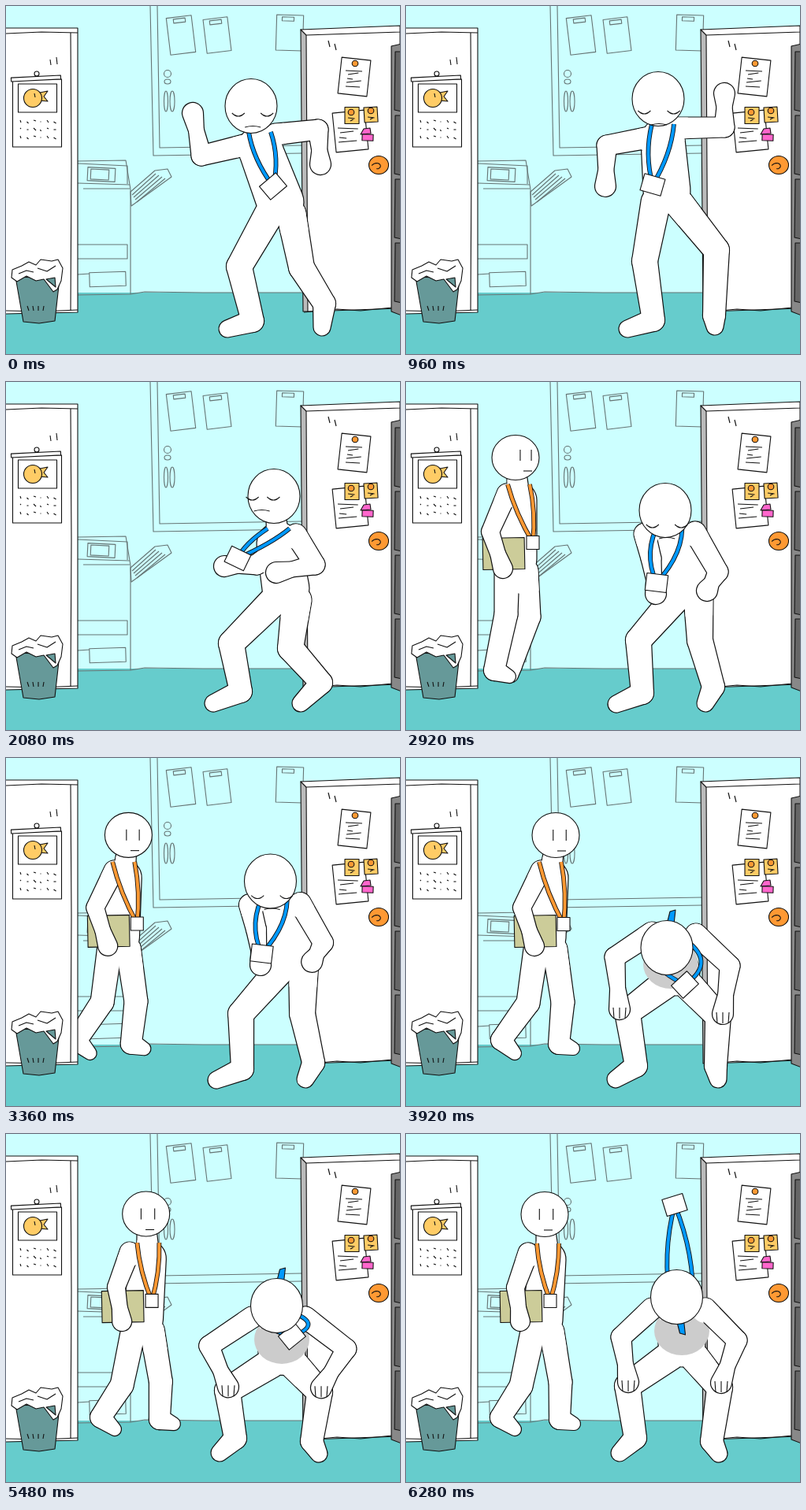
An HTML page with a canvas that plays this animation: 500x442 px, repeating every 6360 ms.

```html
<!DOCTYPE html>
<html lang="en">
<head>
<meta charset="utf-8">
<title>Office dance</title>
<style>
html, body { margin: 0; width: 100%; height: 100%; overflow: hidden; background: #cff; }
canvas { display: block; }
</style>
</head>
<body>
<canvas id="stage" width="500" height="442"></canvas>
<script>
const g = document.getElementById('stage').getContext('2d');
const LOOP = 6360, INK = '#111', GREY = '#667474';

// ---------- drawing helpers ----------
const pts = (s, size = 2) => {
  const n = s.split(' ').map(Number), out = [];
  for (let i = 0; i < n.length; i += size) out.push(n.slice(i, i + size));
  return out;
};

function paint(fill, ink, w = 1.1) {
  if (fill) { g.fillStyle = fill; g.fill(); }
  if (ink) { g.strokeStyle = ink; g.lineWidth = w; g.stroke(); }
}
function path(s, closed) {
  g.beginPath();
  pts(s).forEach(p => g.lineTo(...p));
  if (closed) g.closePath();
}
const poly = (s, fill, ink = INK) => { path(s, true); paint(fill, ink); };
const pen = (s, ink = INK) => { path(s); paint(null, ink); };

function oval(x, y, rx, ry, fill, ink = INK) {
  g.beginPath();
  g.ellipse(x, y, rx, ry, 0, 0, 7);
  paint(fill, ink);
}
function sheet(x, y, w, h, tilt, fill, ink = INK) {
  g.save();
  g.translate(x, y);
  g.rotate(tilt);
  g.beginPath();
  g.rect(-w / 2, -h / 2, w, h);
  g.restore();
  paint(fill, ink);
}
function arc(x, y, w, sag) {
  g.beginPath();
  g.moveTo(x - w / 2, y);
  g.quadraticCurveTo(x, y + sag * 2, x + w / 2, y);
  paint(null, INK);
}
// Short hand-drawn lines standing for writing.
function scribble(x, y, w, rows, gap) {
  for (let i = 0; i < rows; i++) {
    const left = x + (i * 7) % 4, right = x + w * (.7 + .3 * Math.sin(i * 2 + 1));
    pen(`${left} ${y + i * gap} ${right} ${y + i * gap + (i % 2 ? -2 : 1)}`);
  }
}

// ---------- room ----------
function backWall() {
  g.fillStyle = '#cff';
  g.fillRect(0, 0, 500, 442);
  g.fillStyle = '#6cc';
  g.fillRect(0, 364, 500, 78);
  pen('90 367 158 366 176 363 250 364 376 364', GREY);

  pen('183 0 187 190 376 187', GREY);
  pen('192 0 195 180 376 177', GREY);
  [[222, 37, 32, 47, -.12], [268, 37, 31, 43, -.12], [360, 34, 34, 45, .03]].forEach(([x, y, w, h, tilt]) => {
    sheet(x, y, w, h, tilt, null, GREY);
    sheet(x - 2, y - h / 2 + 5, 15, 5, tilt, null, GREY);
  });
  oval(205, 86, 4.5, 4.5, null, GREY);
  oval(205, 96, 4, 3, null, GREY);
  oval(203, 121, 2.5, 13, null, GREY);
  oval(211, 121, 3, 13, null, GREY);

  pen('91 197 152 196 158 233 158 366', GREY);
  pen('91 200 154 203 154 226', GREY);
  pen('91 225 157 227', GREY);
  pen('98 232 157 232', GREY);
  sheet(121, 214, 35, 17, .05, null, GREY);
  sheet(119, 214, 23, 13, .05, null, GREY);
  sheet(122, 312, 64, 18, 0, null, GREY);
  sheet(129, 347, 46, 18, -.03, null, GREY);
  pen('91 341 106 340', GREY);
  poly('158 236 189 209 205 207 210 217 159 254', null, GREY);
  for (let i = 0; i < 4; i++) pen(`${160 + i * 2} ${240 + i * 3} ${190 + i * 4} ${213 + i * 2}`, GREY);
}

function rightDoor() {
  poly('374 30 384 34 384 388 377 388', '#bbb');
  poly('381 36 500 32 500 384 383 388', '#fff');
  poly('374 30 500 25 500 33 381 37', '#fff');
  pen('378 389 420 385 450 387 490 383');
  pen('409 44 411 52');
  pen('417 48 419 56');

  poly('489 51 502 48 502 393 489 388', '#888');
  for (let i = 0; i < 4; i++) {
    const y = 58 + i * 81;
    poly(`494 ${y} 502 ${y} 502 ${y + 76} 493 ${y + 74}`, '#666');
  }

  sheet(442, 90, 37, 46, .11, '#fff');
  scribble(431, 82, 22, 5, 5);
  sheet(437, 159, 41, 50, -.1, '#fff');
  scribble(421, 155, 27, 4, 6);
  sheet(439, 139, 18, 21, 0, '#fc6');
  sheet(463, 138, 17, 19, -.06, '#fc6');
  [[443, 73], [438, 135], [463, 133]].forEach(([x, y]) => oval(x, y, 3.8, 3.8, '#f93'));
  scribble(434, 142, 9, 2, 4);
  scribble(459, 141, 9, 2, 3);
  poly('450 163 454 156 462 155 463 162', '#f6c');
  sheet(459, 167, 14, 8, .03, '#f6c');
  oval(473, 202, 12.5, 11.5, '#f93');
  g.beginPath();
  for (let a = 0; a < 5; a += .3) g.lineTo(471 + Math.cos(a + 3.4) * (7 - a), 204 + Math.sin(a + 3.4) * (5 - a / 2));
  paint(null, INK);
}

function leftDoor() {
  poly('-2 28 91 28 91 389 -2 391', '#fff');
  pen('0 35 45 33 91 34');
  pen('82 34 83 200 82 387');
  pen('0 387 45 388 91 386');
  pen('56 68 57 75');
  pen('64 65 65 74');

  sheet(39.5, 136, 62, 86, 0, '#fff');
  sheet(38, 92, 63, 5, -.05, '#fff');
  oval(39, 86, 3, 3, null);
  sheet(40, 117, 49, 36, 0, '#fff');
  poly('43 110 53 108 48 115 53 121 42 120', '#fc6');
  oval(34, 117, 11.5, 11.5, '#fc6');
  pen('36 111 37 116');
  for (let i = 0; i < 18; i++) {
    const x = 18 + i % 6 * 8.5, y = 145 + Math.floor(i / 6) * 10 + i % 2 * 2;
    pen(`${x} ${y} ${x + 1 + i % 3} ${y + 3 - i % 4}`);
  }

  poly('12 344 22 401 42 403 62 400 68 346', '#699');
  poly('7 345 8 335 20 330 29 325 38 329 44 322 58 324 66 322 72 333 70 349 65 360 60 363 48 347 38 349 26 343 14 350', '#fff');
  poly('51 347 62 345 63 357', '#699');
  pen('16 340 26 336 35 338');
  pen('40 333 52 337 63 330');
  for (let i = 0; i < 4; i++) pen(`${27 + i * 7} 381 ${29 + i * 6} 387`);
}

// ---------- figures ----------
// arm: shoulder, elbow, hand; leg: knee, ankle, toe; look: face offset and strap sag; card: centre and tilt.
function pose(parts) {
  const out = {};
  for (const k in parts) out[k] = pts(parts[k], k === 'look' || k === 'card' ? 3 : 2);
  return out;
}
function shift(p, rule) {
  const out = {};
  for (const k in p) out[k] = k === 'look' ? p[k] : p[k].map(([x, y, ...rest]) => [...rule(x, y), ...rest]);
  return out;
}
const move = (p, dx) => shift(p, (x, y) => [x + dx, y]);
// Feet stay planted while the upper body moves.
const lean = (p, dx, dy) => shift(p, (x, y) => {
  const k = Math.min(1, Math.max(0, (390 - y) / 130));
  return [x + dx * k, y + dy * k];
});

const armUp = pose({
  head: '311 127', look: '2 10 10', chest: '322 180', pelvis: '348 249', card: '339 229 -.7',
  armL: '302 177 248 190 237 136', armR: '342 163 396 157 399 201',
  legL: '296 331 313 400 281 410', legR: '375 332 404 378 401 408'
});
const armOut = pose({
  head: '320 118', look: '1 16 10', chest: '326 170', pelvis: '331 234', card: '313 227 .28',
  armL: '308 167 255 177 253 229', armR: '346 155 404 154 404 111',
  legL: '303 324 314 399 281 410', legR: '394 310 391 393 392 407'
});
const armHigh = { ...armOut, armR: pts('346 155 418 146 424 84') };
const sway = pose({
  head: '340 145', look: '-14 2 10', chest: '346 206', pelvis: '355 262', card: '294 224 .45',
  armL: '330 224 318 232 277 234', armR: '368 194 392 232 343 242',
  legL: '286 332 298 393 263 408', legR: '361 338 400 382 374 408'
});
const stoop = pose({
  head: '329 163', look: '2 19 20', chest: '336 197', pelvis: '357 258', card: '318 255 .12',
  armL: '303 193 311 224 317 269', armR: '367 191 396 241 382 265',
  legL: '295 328 300 395 267 409', legR: '373 328 390 387 380 408'
});
const hunch = pose({
  head: '331 241', look: '0 40 45', chest: '336 248', pelvis: '343 272', card: '354 288 -.75',
  armL: '312 222 265 253 271 319', armR: '368 224 411 264 402 325',
  legL: '281 323 292 391 266 408', legR: '396 328 393 391 396 408'
});
const squat = pose({
  head: '343.5 207', look: '0 40 14', chest: '350 236', pelvis: '350 266', card: '341 90 -.3',
  armL: '312 222 273 258 282 315', armR: '380 222 420 262 400 316',
  legL: '281 320 291 386 271 405', legR: '398 322 388 390 397 406'
});
const squatLow = { ...lean(squat, 0, 13), look: hunch.look, card: move(hunch, 13).card };
squatLow.armL[1][0] -= 18;
squatLow.armR[1][0] += 14;

const walk = pose({
  head: '139 96', look: '13 -3 6', chest: '143 150', pelvis: '140 225', card: '161 204 0',
  armL: '128 142 107 190 123 237', legL: '127 295 112 366 131 374', legR: '156 298 134 360 134 373'
});
const stride = pose({
  head: '190 98', look: '5 0 6', chest: '183 152', pelvis: '177 228', card: '200 211 0',
  armL: '171 143 147 190 163 239', legL: '155 311 121 358 138 375', legR: '199 310 194 363 212 369'
});
const stand = pose({
  head: '176 102', look: '2 0 6', chest: '180 159', pelvis: '173 236', card: '183 212 0',
  armL: '155 151 139 195 145 238', legL: '146 320 120 360 138 375', legR: '196 315 195 362 213 368'
});

const DANCER = {
  strap: '#09f', head: [33, 34.5], body: [28, 30], arm: [14, 13, 10, 13.5], leg: [19, 16.5, 14.5, 11],
  hips: 14, card: [27, 22]
};
const WALKER = {
  strap: '#f93', head: [30, 28.5], body: [23, 26], arm: [13, 11.5, 10, 12.5], leg: [16, 15, 13.5, 8.5],
  hips: 12, card: [16, 17], folder: [53, 40]
};

// Tapered limb piece between two discs.
function capsule([x1, y1, r1], [x2, y2, r2], grow) {
  const l = Math.hypot(x2 - x1, y2 - y1), a = Math.atan2(y2 - y1, x2 - x1);
  const d = Math.acos(Math.max(-1, Math.min(1, (r1 - r2) / (l || 1))));
  g.beginPath();
  g.arc(x1, y1, r1 + grow, a + d, a - d + 2 * Math.PI);
  g.arc(x2, y2, r2 + grow, a - d, a + d);
  g.closePath();
  g.fill();
}
function fillChains(chains, colour, grow) {
  g.fillStyle = colour;
  chains.forEach(c => c.slice(1).forEach((p, i) => capsule(c[i], p, grow)));
}
function inked(chains) {
  fillChains(chains, INK, .6);
  fillChains(chains, '#fff', -.6);
}
// Removes the outline where two parts join.
function weld([x, y], r, chains) {
  g.save();
  g.beginPath();
  g.arc(x, y, r, 0, 7);
  g.clip();
  fillChains(chains, '#fff', -.6);
  g.restore();
}

function face([x, y], [dx, dy], s) {
  const cx = x + dx, cy = y + dy;
  if (s === DANCER) {
    const gap = 19 - Math.abs(dx) * .4;
    arc(cx - gap, cy - 1, 16, 4);
    arc(cx + gap, cy - 1, 16, 4);
    arc(cx + dx * .1, cy + 17, 20, -1.5);
  } else {
    const gap = 9 - dx * .15;
    [-gap, gap].forEach(o => pen(`${cx + o} ${cy - 7} ${cx + o} ${cy + 7}`));
    pen(`${cx - 3} ${cy + 20} ${cx + 8} ${cy + 20}`);
  }
}

function person(p, s) {
  const [head] = p.head, [look] = p.look, [chest] = p.chest, [pelvis] = p.pelvis, [card] = p.card;
  const bowed = look[1] > 30;
  const disc = (q, r) => [q[0], q[1], r];
  const leg = (joints, side) =>
    [[pelvis[0] + side * s.hips, pelvis[1] + 15], ...joints].map((q, i) => disc(q, s.leg[i]));
  const legL = leg(p.legL, -1), legR = leg(p.legR, 1);
  const torso = [
    [disc(chest, s.body[0]), disc(pelvis, s.body[1])],
    [disc(head, 11), disc(chest, 15)]
  ];

  inked([legR]);
  inked([legL, ...torso]);
  weld(legR[0], 30, [legR]);
  if (bowed) oval(chest[0], chest[1] + 14, 35, 31, '#ccc', null);
  if (s.folder) sheet(p.armL[2][0] + 1, p.armL[2][1] - 19, ...s.folder, -.02, '#cc9');

  [p.armL, p.armR].filter(Boolean).forEach(([shoulder, elbow, hand]) => {
    const [r0, r1, r2, r3] = s.arm;
    const near = [0, 1].map(i => elbow[i] + (hand[i] - elbow[i]) * .6);
    const arm = [disc(shoulder, r0), disc(elbow, r1), disc(near, r2), disc(hand, r3)];
    inked([arm]);
    weld(shoulder, 18, [...torso, arm]);
    if (bowed) for (let i = -1; i < 2; i++) pen(`${hand[0] + i * 8} ${hand[1] - 2} ${hand[0] + i * 7} ${hand[1] + 12}`);
  });

  [-1, 1].forEach(side => {
    const x = chest[0] + side * 14, y = chest[1] - 20;
    g.beginPath();
    g.moveTo(x, y);
    g.quadraticCurveTo((x + card[0]) / 2 + side * look[2], (y + card[1]) / 2, card[0], card[1]);
    paint(null, INK, 5.8);
    paint(null, s.strap, 4);
  });
  sheet(card[0], card[1], ...s.card, card[2], '#fff');
  if (bowed) {
    const up = Math.sign(head[1] - card[1]), x = head[0] + 4, y = head[1];
    poly(`${x - 4} ${y + up * 30} ${x + 5} ${y + up * 30} ${x + 7} ${y + up * 48} ${x} ${y + up * 46}`, s.strap);
  }
  oval(...head, ...s.head, '#fff');
  if (!bowed) face(head, look, s);
}

// ---------- timing ----------
const hold = (t, p) => [[t, p], [t + 119, p]];
const dance = [
  ...hold(0, armUp), [480, armOut], [640, armOut], [840, armUp], ...hold(960, armOut),
  [1320, armHigh], [1440, armHigh], [1640, lean(sway, -20, -8)], [1800, lean(sway, 6, -8)],
  [1960, lean(sway, -16, -8)], ...hold(2080, sway), [2320, lean(sway, -14, -6)], [2520, sway],
  [2720, lean(stoop, 8, -10)], ...hold(2920, stoop), [3240, lean(stoop, 10, -10)], [3440, stoop],
  [3640, lean(stoop, 10, -8)], ...hold(3920, hunch)
];
for (let i = 0; i < 14; i++) dance.push([4200 + i * 160, i % 2 ? squat : squatLow]);

const visit = [
  [2440, move(walk, -62)], [2680, move(stride, -88)], ...hold(2920, walk), [3280, move(stride, -36)],
  [3520, move(walk, 34)], [3760, stride], [4720, stride], [5640, stand], [LOOP, stand]
];

// The picture holds between these drawing times: start, end, count.
const ticks = [0];
[[120, 640, 6], [760, 1320, 7], [1440, 1640, 4], [1800, 2320, 7], [2440, 3040, 10], [3120, 3720, 10],
 [3840, 4440, 8], [4520, 5080, 9], [5160, 5720, 9], [5800, 6280, 7]].forEach(([a, b, n]) => {
  for (let i = 0; i < n; i++) ticks.push(Math.round((a + (b - a) * i / (n - 1)) / 40) * 40);
});

function poseAt(keys, t) {
  let i = 0;
  while (i < keys.length - 2 && keys[i + 1][0] <= t) i++;
  const [ta, a] = keys[i], [tb, b] = keys[i + 1];
  const u = Math.min(1, Math.max(0, (t - ta) / (tb - ta))), k = u * u * (3 - 2 * u);
  const out = {};
  for (const part in a)
    out[part] = a[part].map((q, n) => q.map((v, j) => v + (b[part][n][j] - v) * k));
  return out;
}

function draw(now) {
  const t = now % LOOP;
  const shown = ticks.filter(k => k <= t).pop();
  backWall();
  if (shown >= 2440) person(poseAt(visit, shown), WALKER);
  rightDoor();
  leftDoor();
  person(poseAt(dance, shown), DANCER);
}

g.lineJoin = 'round';
const start = performance.now();
(function frame() {
  draw(performance.now() - start);
  requestAnimationFrame(frame);
})();
</script>
</body>
</html>
```
